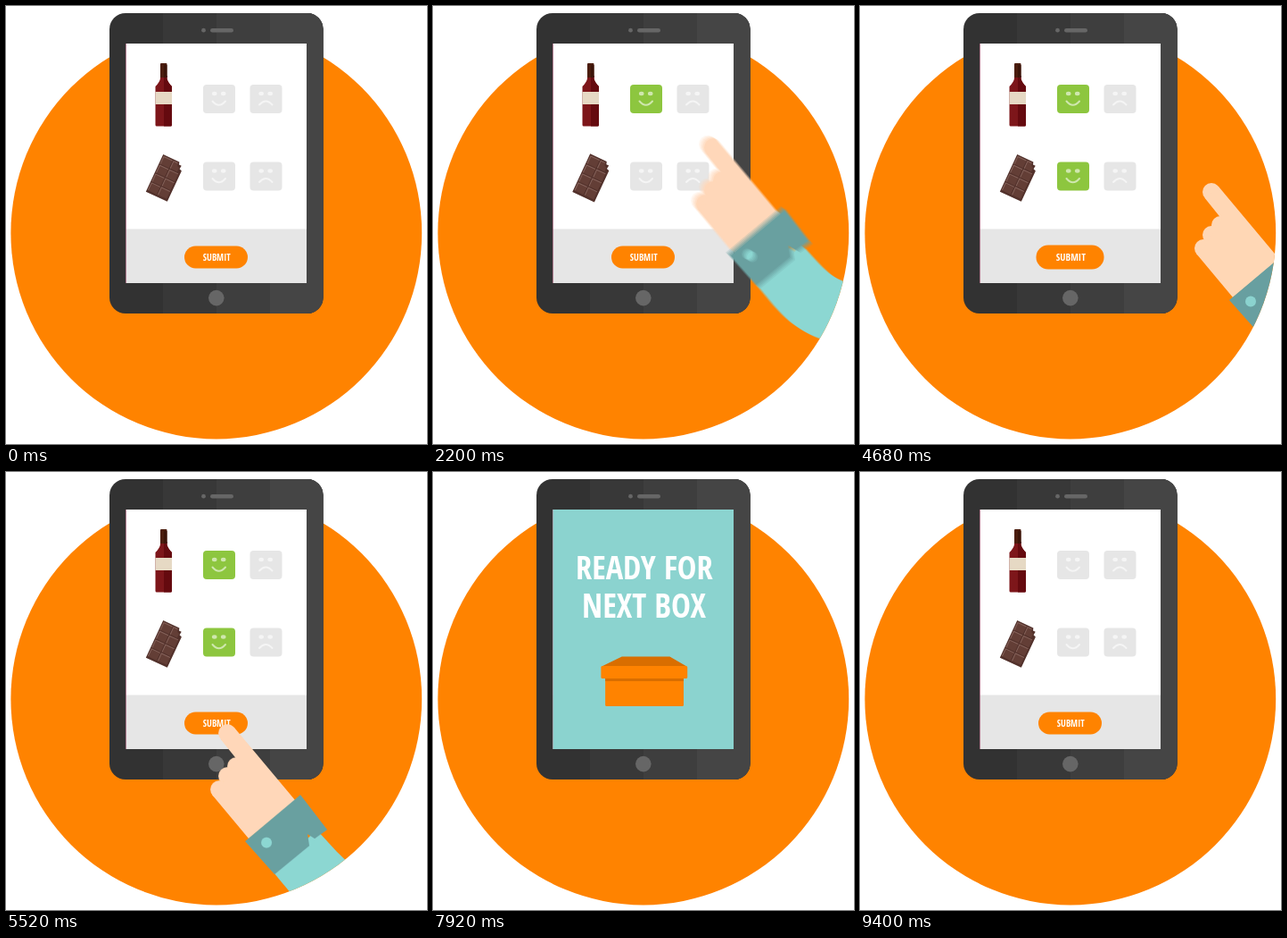
An HTML page for the animation above (9600 ms loop, 472 by 490 pixels).

```html
<!DOCTYPE html>
<html lang="en">
<head>
<meta charset="utf-8">
<title>Tablet survey</title>
<style>
  html, body { margin: 0; width: 100%; height: 100%; overflow: hidden; background: #fff; }
  svg { display: block; width: 472px; height: 490px; }
  text {
    font-family: "Open Sans Condensed", "Open Sans", Roboto, sans-serif;
    font-weight: 700; font-stretch: extra-condensed; text-anchor: middle; fill: #fff;
  }
  .face { fill: #fff; fill-opacity: .58; }
  .mouth { fill: none; stroke: #fff; stroke-opacity: .58; stroke-width: 2; stroke-linecap: round; }
  #hand { isolation: isolate; }
  #hand use { mix-blend-mode: plus-lighter; }
</style>
</head>
<body>
<svg viewBox="0 0 472 490">
  <defs>
    <clipPath id="disc"><circle cx="235.8" cy="254" r="230.4"/></clipPath>
    <clipPath id="shell"><rect x="116" y="8" width="239.5" height="336" rx="18"/></clipPath>
    <g id="tile">
      <rect width="36" height="32" rx="4"/>
      <g class="face">
        <ellipse cx="12.7" cy="10" rx="2.8" ry="2.2"/>
        <ellipse cx="22.7" cy="10" rx="2.8" ry="2.2"/>
      </g>
    </g>
    <g id="happy"><use href="#tile"/><path class="mouth" d="M10.5 18.5Q17.7 27 25 18.5"/></g>
    <g id="sad"><use href="#tile"/><path class="mouth" d="M10.5 22.5Q17.7 14.5 25 22.5"/></g>
    <!-- origin is the centre of the fingertip -->
    <g id="arm">
      <path fill="#8bd3cf" d="M100 108C130 140 138 153 165 154C190 154 205 145 260 141V228C200 228 170 227 150 223C95 213 78 187 52 156Z"/>
      <g fill="#ffd7b5">
        <circle r="10"/><circle cx="10" cy="37" r="10"/><circle cx="0" cy="48" r="10"/><circle cx="-9" cy="63" r="10"/>
        <path d="M7.8-6.2L76 75L24 118L-17 69L-9 63L0 48L12 31L-7.5 6.8Z"/>
      </g>
      <path fill="#689fa0" d="M82 69L112 108L98 118L90 113L92 126L53 158L20 121Z"/>
      <circle cx="44" cy="122.5" r="6" fill="#8bd3cf"/>
    </g>
  </defs>

  <circle cx="235.8" cy="254" r="230.4" fill="#ff8300"/>
  <g clip-path="url(#shell)">
    <rect x="116" y="8" width="240" height="336" fill="#323232"/>
    <rect x="176" y="8" width="180" height="336" fill="#383838"/>
    <rect x="236" y="8" width="120" height="336" fill="#3e3e3e"/>
    <rect x="296" y="8" width="60" height="336" fill="#454545"/>
  </g>
  <g fill="#666">
    <circle cx="221.5" cy="27.2" r="2.4"/>
    <rect x="229" y="25" width="26" height="4.6" rx="2.3"/>
    <circle cx="235.8" cy="326.6" r="8.8"/>
  </g>

  <rect x="134" y="42" width="203" height="268" fill="#fff"/>
  <rect x="134" y="249.5" width="203" height="60.5" fill="#e6e6e6"/>
  <rect x="134" y="42" width=".8" height="268" fill="#9a5a72"/>

  <g id="row1">
    <g id="bottle">
      <path fill="#7d161a" d="M173 78H180.5V81Q181 85 186 90V133Q186 134.5 184.5 134.5H169Q167.5 134.5 167.5 133V90Q172.500 85 173 81Z"/>
      <path fill="#650a0f" d="M177 78H180.5V81Q181 85 186 90V133Q186 134.5 184.5 134.5H177Z"/>
      <path fill="#4b1d0e" d="M173 65Q173 64 174 64H179.500Q180.5 64 180.5 65V80H173Z"/>
      <rect x="177" y="66" width="3.500" height="14" fill="#3b1409"/>
      <rect x="167.5" y="96" width="18.5" height="14" fill="#e6d9c4"/>
    </g>
    <use id="yes1" href="#happy" x="221" y="88"/>
    <use href="#sad" x="273.500" y="88" fill="#e6e6e6"/>
  </g>
  <g id="row2">
    <g id="choc"><g id="bar" transform="translate(178.300 192.300) rotate(25)">
      <path fill="#52312b" d="M-13-23H7L8-20L11-20L10.500-16L13.500-15V23H-13Z"/>
    </g></g>
    <use id="yes2" href="#happy" x="221" y="174.500"/>
    <use href="#sad" x="273.500" y="174.500" fill="#e6e6e6"/>
  </g>
  <g id="submit">
    <rect x="200" y="268.500" width="71" height="25" rx="12.500" fill="#ff8300"/>
    <text x="236.300" data-mid="281.500" data-size="14" data-room="31">SUBMIT</text>
  </g>

  <g id="ready">
    <rect x="134.500" y="42" width="202.500" height="268" fill="#8bd3cf"/>
    <g id="words">
      <text x="236.800" data-mid="108" data-size="47" data-room="146">READY FOR</text>
      <text x="236.500" data-mid="148.500" data-size="47" data-room="132">NEXT BOX</text>
    </g>
    <g id="box">
      <path fill="#d96e00" d="M191 218.500L213 208H264L282.500 218.500Z"/>
      <rect x="195.300" y="230" width="83.500" height="30.500" rx="1" fill="#ff8300"/>
      <rect x="195.300" y="231" width="83.500" height="3" fill="#d96e00"/>
      <rect x="190.800" y="217.800" width="92" height="13.400" rx="1.500" fill="#ff8300"/>
    </g>
  </g>

  <g clip-path="url(#disc)"><g id="hand"></g></g>
</svg>
<script>
const LOOP = 9600, STEP = 40, SAMPLES = 5, SHUTTER = 20;
const NS = 'http://www.w3.org/2000/svg';
const $ = id => document.getElementById(id);
const clamp = v => Math.max(0, Math.min(1, v));
const ramp = (t, a, b) => clamp((t - a) / (b - a));

function add(parent, tag, attrs) {
  const el = document.createElementNS(NS, tag);
  for (const k in attrs) el.setAttribute(k, attrs[k]);
  return parent.appendChild(el);
}

// chocolate squares
for (let i = 0; i < 8; i++) {
  const x = -11.3 + (i % 2) * 12.2, y = -21 + (i >> 1) * 10.8;
  if (i === 1) {
    add($('bar'), 'path', { d: 'M.9-21H6L7-18L9.500-17V-12H.9Z', fill: '#633e36' });
  } else {
    add($('bar'), 'rect', { x, y, width: 10.6, height: 9.2, fill: '#633e36' });
  }
  add($('bar'), 'path', { d: `M${x} ${y + 9}V${y}H${x + (i === 1 ? 5 : 10.6)}`, fill: 'none', stroke: '#85625a', 'stroke-width': 1 });
}

const arms = Array.from({ length: SAMPLES }, () => add($('hand'), 'use', { href: '#arm' }));

// choose the font size that fits the line
for (const el of document.querySelectorAll('text')) {
  const { mid, size, room } = el.dataset;
  el.style.fontSize = size + 'px';
  const fit = Math.min(size, size * room / el.getComputedTextLength());
  el.style.fontSize = fit + 'px';
  el.setAttribute('y', +mid + fit * 0.357);
}

// fingertip path: time, x, y
const PATH = [
  [900, 520, 228], [1120, 412, 209], [1360, 306, 196], [1600, 246, 124], [1920, 246, 124],
  [2160, 300, 150], [2520, 394, 208], [2840, 394, 208], [3080, 326, 194], [3280, 272, 190],
  [3440, 246, 204], [3760, 246, 204], [4320, 394, 208], [4720, 394, 208],
  [5160, 290, 281], [5360, 248, 292], [5520, 248, 292], [5880, 425, 515]
];

function slope(i, k) {
  const a = PATH[i - 1], b = PATH[i], c = PATH[i + 1];
  if (!a || !c || (a[1] === b[1] && a[2] === b[2]) || (c[1] === b[1] && c[2] === b[2])) return 0;
  return (c[k] - a[k]) / (c[0] - a[0]);
}

function tip(t) {
  const last = PATH.length - 1;
  if (t <= PATH[0][0]) return PATH[0].slice(1);
  if (t >= PATH[last][0]) return PATH[last].slice(1);
  let i = 0;
  while (PATH[i + 1][0] < t) i++;
  const a = PATH[i], b = PATH[i + 1], d = b[0] - a[0], u = (t - a[0]) / d, v = 1 - u;
  return [1, 2].map(k =>
    v * v * (1 + 2 * u) * a[k] + u * v * v * d * slope(i, k) +
    u * u * (3 - 2 * u) * b[k] - u * u * v * d * slope(i + 1, k));
}

// two beats of a sine
function pulse(t, start) {
  const n = (t - start) / 840;
  return n > 0 && n < 2 ? 1 + 0.105 * Math.sin(n * 2 * Math.PI) : 1;
}

// springy growth from nothing
const pop = ms => ms <= 0 ? 0 : 1 - Math.exp(-0.0063 * ms) * Math.cos(0.0113 * ms);

function scale(id, x, y, s) {
  $(id).setAttribute('transform', `translate(${x} ${y}) scale(${s}) translate(${-x} ${-y})`);
}

function drawHand(t) {
  const on = t >= PATH[0][0] && t < PATH[PATH.length - 1][0];
  $('hand').style.display = on ? '' : 'none';
  if (!on) return;
  const p = tip(t - SHUTTER / 2), q = tip(t + SHUTTER / 2);
  const still = Math.hypot(p[0] - q[0], p[1] - q[1]) < 0.3;
  arms.forEach((el, i) => {
    const [x, y] = still ? tip(t) : tip(t + SHUTTER * (i / (SAMPLES - 1) - 0.5));
    el.setAttribute('transform', `translate(${x} ${y})`);
    el.style.opacity = still ? 1 : 1 / SAMPLES;
    el.style.display = still && i ? 'none' : '';
  });
}

function draw(t) {
  const enter = start => t < 5900 || t >= 9400 ? 1 : pop((t - start) * 1.4);
  scale('row1', 238, 104, enter(8900));
  scale('row2', 228, 192, enter(8990));
  scale('bottle', 176.8, 99.3, pulse(t, 130));
  scale('choc', 178.3, 192.3, pulse(t, 1810));
  scale('submit', 235.5, 281, Math.min(1, enter(9020)) * pulse(t, 3520));

  const picked = at => t >= at && t < 5900 ? '#8dc63f' : '#e6e6e6';
  $('yes1').setAttribute('fill', picked(1680));
  $('yes2').setAttribute('fill', picked(3520));

  $('ready').style.opacity = ramp(t, 5640, 5880) * (1 - ramp(t, 8640, 8880));
  const s = pop(t - 5943) * pulse(t, 6730) * (1 - ramp(t, 8420, 8640) ** 2);
  scale('words', 236.8, 128, s);
  scale('box', 236.8, 234.3, s);

  drawHand(t);
}

const begin = performance.now();
function tick() {
  const t = (performance.now() - begin) % LOOP;
  draw(Math.floor(t / STEP) * STEP);
  requestAnimationFrame(tick);
}
tick();
</script>
</body>
</html>
```
